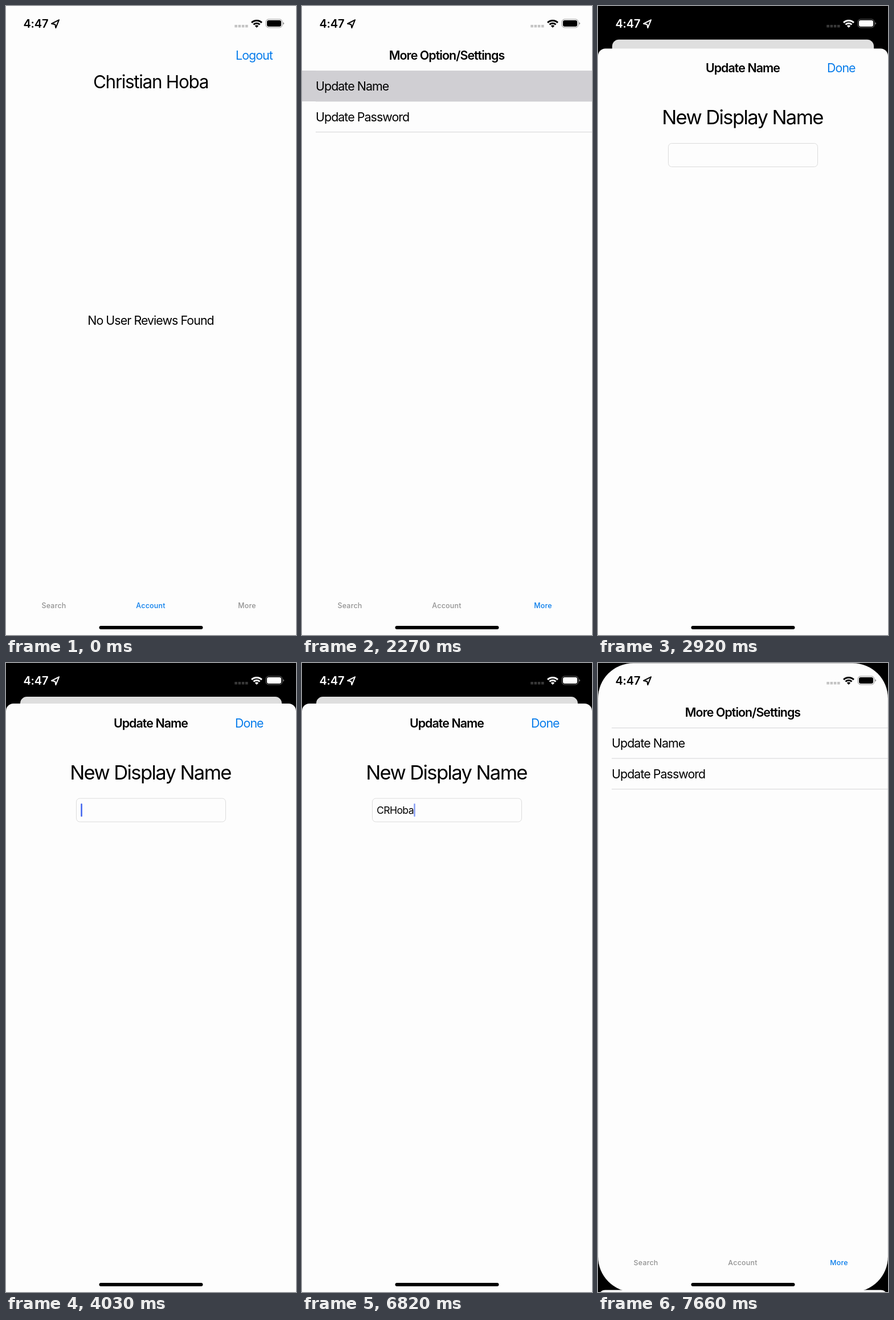
Recreate the animation shown at these times as an HTML page. Size 509 by 1101 pixels, loop 8 s.

```html
<!DOCTYPE html>
<html lang="en">
<head>
<meta charset="utf-8">
<title>Update name</title>
<style>
  html, body { margin: 0; height: 100%; overflow: hidden; background: #000; }
  svg { display: block; width: 509px; height: 1101px; }
  text { font: 400 21.4px Inter, sans-serif; letter-spacing: -.044em; font-optical-sizing: none; white-space: pre; }
  .bold { font-weight: 600; }
  .mid { text-anchor: middle; }
  .link { fill: #077ceb; }
  #tabs text { font-size: 12.4px; font-weight: 500; letter-spacing: .02em; text-anchor: middle; fill: #929292; }
  #tabs .on { fill: #077ceb; }
  #name { font-size: 31.5px; letter-spacing: -.042em; }
  #heading { font-size: 34.6px; letter-spacing: -.047em; }
  #typed { font-size: 17.6px; letter-spacing: -.035em; }
  #clock { font-size: 20px; font-weight: 600; letter-spacing: -.01em; }
</style>
</head>
<body>
<svg viewBox="0 0 509 1101">
  <g id="back">
    <rect id="page" width="509" height="1101" fill="#fdfdfd"/>
    <g id="account">
      <text class="link" x="403" y="94">Logout</text>
      <text id="name" class="mid" x="254" y="144">Christian Hoba</text>
      <text class="mid" x="254" y="558">No User Reviews Found</text>
    </g>
    <g id="more">
      <text class="bold mid" x="254" y="94">More Option/Settings</text>
      <rect id="pressed" y="113" width="509" height="54" fill="#d0cfd3"/>
      <path d="M24 113.5H509M24 166.9H509M24 220.7H509" stroke="#d3d3d6"/>
      <text x="24" y="148">Update Name</text>
      <text x="24" y="202">Update Password</text>
    </g>
    <g id="tabs">
      <text x="84" y="1054">Search</text>
      <text x="254" y="1054">Account</text>
      <text x="423" y="1054">More</text>
    </g>
    <rect id="dim" width="509" height="1101"/>
  </g>
  <g id="sheet">
    <rect width="509" height="1130" rx="13" fill="#fdfdfd"/>
    <text class="bold mid" x="254" y="42">Update Name</text>
    <text class="link" x="402" y="42">Done</text>
    <text id="heading" class="mid" x="253.5" y="133">New Display Name</text>
    <rect x="123.5" y="166" width="262" height="41" rx="6" fill="none" stroke="#dcdcdc"/>
    <text id="typed" x="131" y="193"></text>
    <rect id="caret" y="175" width="2.5" height="23" rx="1" fill="#3f63ee"/>
  </g>
  <g id="status" fill="currentColor" stroke="none">
    <text id="clock" x="30.5" y="37.5">4:47</text>
    <path d="M93 24.3L80 31L86.2 32.2L87.4 38.2Z" fill="none" stroke="currentColor" stroke-width="2" stroke-linejoin="round"/>
    <path d="M401.3 35.3h23.4" stroke="currentColor" stroke-width="4.6" stroke-dasharray="4.6 1.65" opacity=".22"/>
    <path d="M431.1 29.1A12.6 12.6 0 0 1 448.9 29.1M434.5 32.5A7.8 7.8 0 0 1 445.5 32.5" fill="none" stroke="currentColor" stroke-width="3"/>
    <path d="M440 38L436.8 34.8A4.5 4.5 0 0 1 443.2 34.8Z"/>
    <rect x="456.2" y="23.2" width="28.6" height="14.6" rx="4.6" fill="none" stroke="currentColor" opacity=".42"/>
    <rect x="458" y="25" width="25" height="11" rx="3"/>
    <path d="M486.3 28.2q1.8 .7 1.8 2.3t-1.8 2.3z" opacity=".5"/>
  </g>
  <rect x="163.5" y="1085" width="182" height="6" rx="3"/>
</svg>
<script>
const $ = id => document.getElementById(id);
const set = (id, attrs) => { for (const k in attrs) $(id).setAttribute(k, attrs[k]); };
const show = (id, on) => { $(id).style.display = on ? '' : 'none'; };
const mix = (a, b, p) => a + (b - a) * p;
const clamp = v => Math.max(0, Math.min(1, v));

const LOOP = 8000, TICK = 92.9, SETTLED = 7660;
const OPEN_MORE = 500, PRESS = 2265, OPEN = 2489, FOCUS = 3375, CLOSE = 7227;
const WORD = 'CRHoba';
const KEYS = [4780, 4960, 5430, 5620, 5990, 6355];
const tabs = document.querySelectorAll('#tabs text');

// Critically damped spring, 0 to 1, t in ms
const spring = t => {
  const x = Math.max(0, t) * .01826;
  return 1 - (1 + x) * Math.exp(-x);
};
const smooth = t => {
  const u = clamp(t / 420);
  return u * u * (3 - 2 * u);
};
// The caret holds, fades out and fades back in
const blink = t => {
  const u = t % 930;
  return u < 720 ? 1 - clamp((u - 390) / 210) : (u - 720) / 210;
};

function draw(t) {
  const p = spring(t - OPEN) - spring(t - CLOSE);
  const scale = mix(1, .902, p);
  const onMore = t >= OPEN_MORE;

  show('account', !onMore);
  show('more', onMore);
  show('pressed', t >= PRESS && t < FOCUS);
  tabs.forEach((tab, i) => tab.classList.toggle('on', i === (onMore ? 2 : 1)));

  set('back', { transform: `translate(${254.5 * (1 - scale)} ${59 * p}) scale(${scale})` });
  const rx = p > 0 ? mix(62, 13, p) : 0;
  set('page', { rx });
  set('dim', { rx, opacity: .12 * p });
  set('sheet', { transform: `translate(0 ${mix(1101, 71, p)})` });
  show('sheet', p > 0);

  const count = KEYS.filter(k => t >= k - 5).length;
  $('typed').textContent = WORD.slice(0, count);
  const lastInput = count ? KEYS[count - 1] : 3660;
  set('caret', {
    x: 131.3 + (count ? $('typed').getComputedTextLength() : 0),
    opacity: t >= FOCUS && t < CLOSE ? blink(Math.max(0, t - lastInput)) : 0
  });

  const grey = Math.round(255 * (smooth(t - OPEN) - smooth(t - CLOSE)));
  $('status').style.color = `rgb(${grey},${grey},${grey})`;
}

function frame(now) {
  const t = now % LOOP;
  const step = Math.floor((t - PRESS + 1) / TICK);
  draw(Math.min(SETTLED, 2270 + step * TICK));
  requestAnimationFrame(frame);
}
requestAnimationFrame(frame);
</script>
</body>
</html>
```
